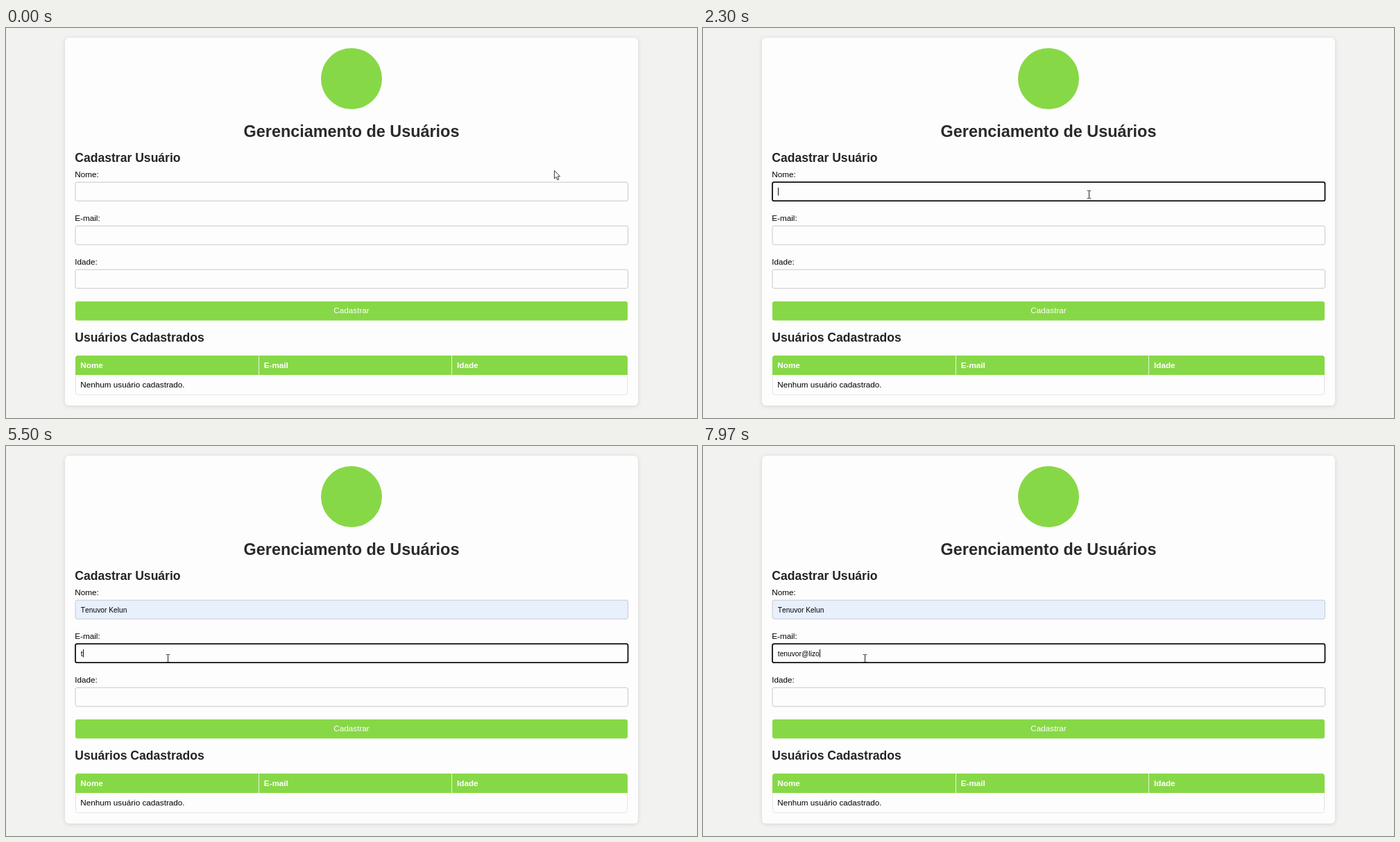
Recreate the animation shown at these times as an HTML page. Size 996 by 562 pixels, loop 8000 ms.

```html
<!DOCTYPE html>
<html lang="pt-BR">
<head>
<meta charset="utf-8">
<title>Gerenciamento de Usuários</title>
<style>
  html, body { margin: 0; width: 100%; height: 100%; overflow: hidden; background: #f2f2f1; }
  svg { display: block; width: 996px; height: 562px; font: 11.71px "Liberation Sans", Arial, sans-serif; }
  .card { fill: #fdfdfd; filter: drop-shadow(0 1px 3px rgba(0, 0, 0, .12)); }
  .green { fill: #87d847; }
  .h1 { font-size: 23.42px; font-weight: bold; fill: #2a2a2a; text-anchor: middle; }
  .h2 { font-size: 17.57px; font-weight: bold; fill: #242424; }
  .head { font-weight: bold; fill: #fff; }
  .value { font-size: 10.25px; font-kerning: none; white-space: pre; }
  .button { fill: #fff; text-anchor: middle; }
  .line { fill: none; stroke: #e4e4e2; }
  .spell { fill: none; stroke: #e0343c; stroke-dasharray: 1.5 1; }
</style>
</head>
<body>
<svg id="stage" viewBox="0 0 996 562">
  <rect class="card" x="85" y="14" width="826" height="530" rx="6"/>
  <circle class="green" cx="498" cy="73" r="44"/>
  <text class="h1" x="498" y="156.5">Gerenciamento de Usuários</text>
  <text class="h2" x="99.3" y="193">Cadastrar Usuário</text>
  <g id="form"></g>
  <rect class="green" x="100" y="394" width="796" height="27.5" rx="3"/>
  <text class="button" x="498" y="411.3">Cadastrar</text>
  <text class="h2" x="99.3" y="452.3">Usuários Cadastrados</text>
  <path class="line" d="M100.5 500V525.5Q100.5 528.5 103.5 528.5H892.5Q895.5 528.5 895.5 525.5V500"/>
  <path class="green" d="M100 500V476Q100 472 104 472H892Q896 472 896 476V500Z"/>
  <path d="M364.5 472V500M642.5 472V500" stroke="#e6f4da"/>
  <text class="head" x="107.3" y="489.6">Nome</text>
  <text class="head" x="371.7" y="489.6">E-mail</text>
  <text class="head" x="650" y="489.6">Idade</text>
  <text x="107.3" y="518.2">Nenhum usuário cadastrado.</text>
  <path id="spell" class="spell"/>
  <path id="caret" stroke="#111"/>
  <g id="pointer">
    <path id="arrow" d="M.4.4V12L3 9.6 5 14 6.9 13.1 5 9H8.6Z" fill="#fff" stroke="#222" stroke-width=".9"/>
    <path id="beam" d="M-2.5-5.5H-.8L0-5 .8-5.5H2.5M0-5V5M-2.5 5.5H-.8L0 5 .8 5.5H2.5" fill="none" stroke="#222"/>
  </g>
</svg>
<script>
const LOOP = 8000, BLINK = 500;
const NAME_FOCUS = 2110, FILL = 4620, MAIL_FOCUS = 5080;
const FIRST = 'Tenuvor', FULL = 'Tenuvor Kelun', MAIL = 'tenuvor@lizo';
const LEFT = 107.8;
const $ = id => document.getElementById(id);

// Evenly spaced key presses
const keys = (start, step, count) => Array.from({ length: count }, (_, i) => start + i * step);
const nameKeys = keys(2800, 121, 7);
const mailKeys = [...keys(5400, 122, 7), 6970, 7300, 7500, 7700, 7940];

// Pointer stops: time, x, y
const route = [
  [0, 790, 205], [30, 790, 205], [830, 632, 159.5], [1730, 632, 159.5],
  [1770, 600, 190], [2030, 600, 190], [2130, 556.5, 240], [3829, 556.5, 240],
  [3830, 561.5, 238.5], [4630, 215.5, 278], [4870, 215.5, 278],
  [5100, 233.5, 306], [LOOP, 233.5, 306]
];

function make(tag, attrs, parent, text = '') {
  const node = document.createElementNS('http://www.w3.org/2000/svg', tag);
  for (const key in attrs) node.setAttribute(key, attrs[key]);
  node.textContent = text;
  return parent.appendChild(node);
}

const fields = ['Nome:', 'E-mail:', 'Idade:'].map((label, i) => {
  const y = 222 + 63 * i, form = $('form');
  make('text', { x: 99.3, y: y - 6.9 }, form, label);
  return {
    y,
    box: make('rect', { x: 100, y: y + .2, width: 796.5, height: 27, rx: 2.5 }, form),
    value: make('text', { class: 'value', x: LEFT, y: y + 17.5 }, form)
  };
});

function pointerAt(t) {
  const i = route.findIndex(stop => stop[0] > t);
  const [t0, x0, y0] = route[i - 1], [t1, x1, y1] = route[i];
  const p = (t - t0) / (t1 - t0), e = p * p * (3 - 2 * p);
  return [x0 + (x1 - x0) * e, y0 + (y1 - y0) * e];
}

function overText(x, y) {
  const inTitle = x > 343 && x < 654 && y > 134 && y < 163;
  return inTitle || fields.some(f => x > 100 && x < 897 && y > f.y && y < f.y + 27.5);
}

const show = (node, on) => node.setAttribute('visibility', on ? 'visible' : 'hidden');

function draw(t) {
  const typed = list => list.filter(k => k <= t).length;
  const filled = t >= FILL;
  const focus = t < NAME_FOCUS ? -1 : t < MAIL_FOCUS ? 0 : 1;
  const values = [filled ? FULL : FIRST.slice(0, typed(nameKeys)), MAIL.slice(0, typed(mailKeys)), ''];

  fields.forEach((field, i) => {
    field.value.textContent = values[i];
    const active = i === focus;
    field.box.setAttribute('fill', i === 0 && filled ? '#e8f0fe' : '#fdfdfd');
    field.box.setAttribute('stroke', active ? '#101010' : '#c8c9ca');
    field.box.setAttribute('stroke-width', active ? 1.8 : 1);
  });

  const active = fields[focus];
  const last = Math.max(...[NAME_FOCUS, FILL, MAIL_FOCUS, ...nameKeys, ...mailKeys].filter(k => k <= t));
  show($('caret'), active && Math.floor((t - last) / BLINK) % 2 === 0);
  if (active) {
    const x = Math.round(LEFT + active.value.getComputedTextLength()) + .5;
    $('caret').setAttribute('d', `M${x} ${active.y + 8}v11.5`);
  }

  const misspelt = focus === 0 && filled;
  show($('spell'), misspelt);
  if (misspelt) {
    const at = n => LEFT + active.value.getSubStringLength(0, n);
    const cut = FIRST.length;
    $('spell').setAttribute('d', `M${LEFT} 240.7H${at(cut)}M${at(cut + 1)} 240.7H${at(FULL.length)}`);
  }

  const [x, y] = pointerAt(t), text = overText(x, y);
  $('pointer').setAttribute('transform', `translate(${x} ${y})`);
  show($('arrow'), !text);
  show($('beam'), text);
}

const start = performance.now();
function tick() {
  draw((performance.now() - start) % LOOP);
  requestAnimationFrame(tick);
}
tick();
</script>
</body>
</html>
```
